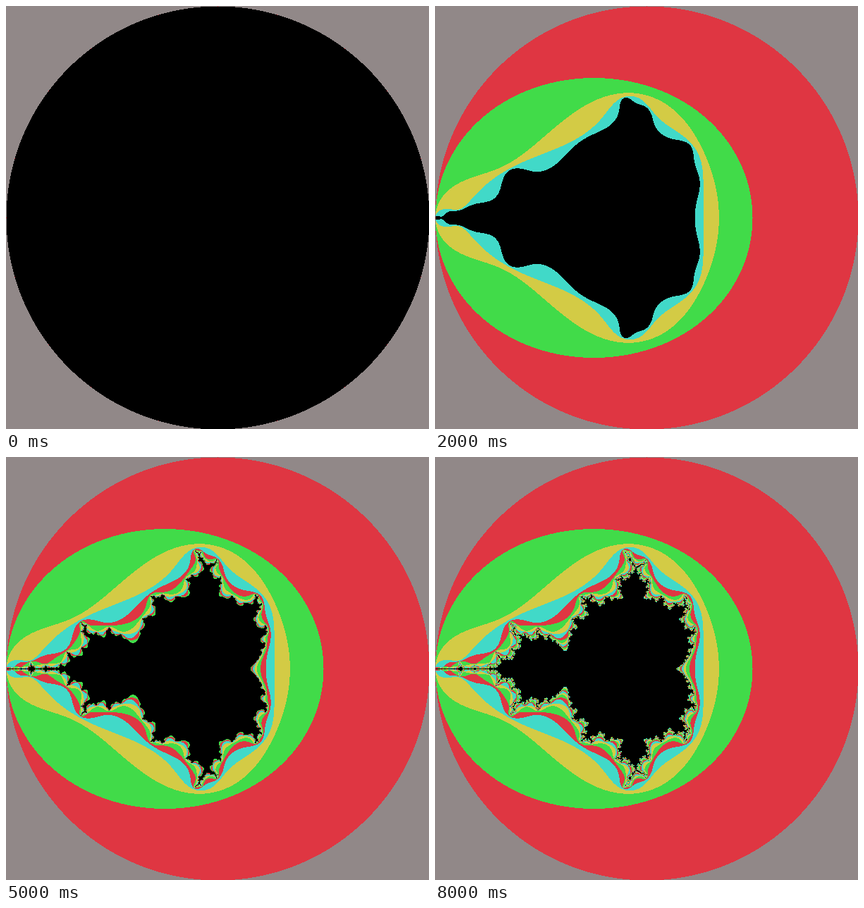
Write an HTML page with a canvas that moves like this. It is 600 px wide and 600 px high and loops after 8.5 s.

```html
<!DOCTYPE html>
<html lang="en">
<head>
<meta charset="utf-8">
<title>Escape bands</title>
<style>
  html, body { margin: 0; width: 100%; height: 100%; overflow: hidden; background: #000; }
  canvas { display: block; width: 600px; height: 600px; }
</style>
</head>
<body>
<canvas id="stage" width="600" height="600"></canvas>
<script>
const SIZE = 600, STEPS = 17, STEP_MS = 500, NEVER = 255;
const ctx = document.getElementById('stage').getContext('2d');
const image = ctx.createImageData(SIZE, SIZE);
const pixels = new Uint32Array(image.data.buffer);

const rgb = (r, g, b) => (255 << 24 | b << 16 | g << 8 | r) >>> 0;
const BLACK = rgb(0, 0, 0);
const OUTSIDE = rgb(145, 136, 136);
const BANDS = [rgb(223, 54, 66), rgb(65, 219, 73), rgb(211, 203, 69), rgb(65, 217, 200)];
const bandColor = n => n < 2 ? OUTSIDE : BANDS[(n - 2) % BANDS.length];

// For z -> z*z + c: the step that reaches radius 2, and the step that passes it.
const reach = new Uint8Array(SIZE * SIZE).fill(NEVER);
const leave = new Uint8Array(SIZE * SIZE).fill(NEVER);

function measure(i, cx, cy) {
  let x = 0, y = 0;
  for (let n = 1; n <= STEPS + 1; n++) {
    const nx = x * x - y * y + cx;
    y = 2 * x * y + cy;
    x = nx;
    const r2 = x * x + y * y;
    if (r2 >= 4 && reach[i] === NEVER) reach[i] = n;
    if (r2 > 4) {
      leave[i] = n;
      return;
    }
  }
}

for (let py = 0; py < SIZE; py++) {
  for (let px = 0; px < SIZE; px++) {
    measure(py * SIZE + px, (px - 300) / 150, (py - 300) / 150);
  }
}

function draw(depth) {
  for (let i = 0; i < pixels.length; i++) {
    pixels[i] = depth < reach[i] ? BLACK : bandColor(Math.min(leave[i], depth + 1));
  }
  ctx.putImageData(image, 0, 0);
}

let shown = 0;
const start = performance.now();

function tick() {
  const elapsed = Math.max(0, performance.now() - start);
  const depth = Math.floor(elapsed / STEP_MS) % STEPS + 1;
  if (depth !== shown) {
    draw(depth);
    shown = depth;
  }
  requestAnimationFrame(tick);
}
tick();
</script>
</body>
</html>
```
